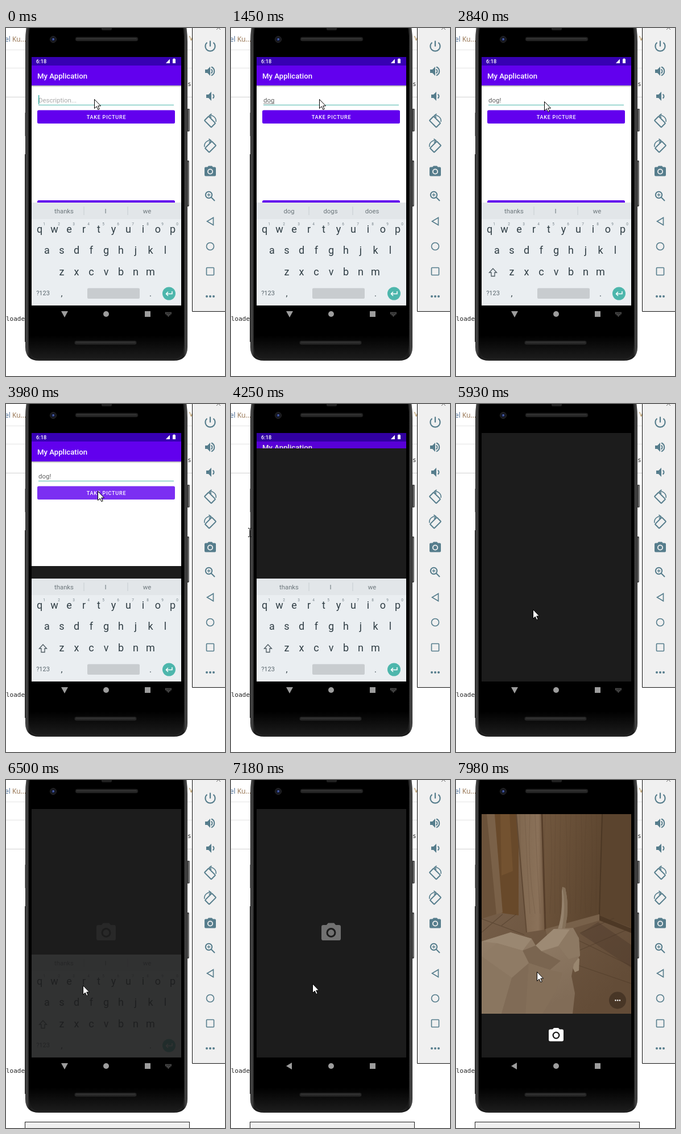
Write an HTML page that moves like this. It is 385 by 612 pixels and loops after 8 s.

```html
<!DOCTYPE html>
<html lang="en">
<head>
<meta charset="utf-8">
<title>Photo note</title>
<style>
  html, body { margin: 0; width: 100%; height: 100%; overflow: hidden; background: #fff; }
  svg { display: block; width: 385px; height: 612px; font-family: Roboto, sans-serif; }
  .mono { font: 11px 'DejaVu Sans Mono', monospace; fill: #222; }
  .mid { text-anchor: middle; }
  .key { font-size: 18px; fill: #2f3d44; }
  .digit { font-size: 6.5px; fill: #78858c; }
  .word { font-size: 11.3px; fill: #6c767b; }
  .line { fill: none; stroke: #567d8c; stroke-width: 2; }
  .solid { fill: #567d8c; }
</style>
</head>
<body>
<svg viewBox="0 0 385 612">
  <defs>
    <linearGradient id="rim">
      <stop offset="0" stop-color="#222"/><stop offset=".008" stop-color="#4a4a4a"/>
      <stop offset=".025" stop-color="#1a1a1a"/><stop offset=".975" stop-color="#1a1a1a"/>
      <stop offset=".992" stop-color="#4a4a4a"/><stop offset="1" stop-color="#222"/>
    </linearGradient>
    <linearGradient id="chin" x2="0" y2="1">
      <stop offset=".93"/><stop offset="1" stop-color="#1c1c1c"/>
    </linearGradient>
    <linearGradient id="shade" x2="0" y2="1">
      <stop stop-color="#aaa"/><stop offset="1" stop-color="#fff"/>
    </linearGradient>
    <linearGradient id="wall" y2=".4"><stop stop-color="#72583f"/><stop offset="1" stop-color="#5c452f"/></linearGradient>
    <linearGradient id="post"><stop stop-color="#7f674f"/><stop offset=".75" stop-color="#8a7159"/><stop offset="1" stop-color="#735a43"/></linearGradient>
    <linearGradient id="floor" x2=".7" y2="1"><stop stop-color="#7e6650"/><stop offset="1" stop-color="#634c37"/></linearGradient>
    <linearGradient id="fur" x2=".5" y2="1"><stop stop-color="#95816b"/><stop offset="1" stop-color="#816c57"/></linearGradient>
    <clipPath id="view"><path d="M45 60h263v351H45z"/></clipPath>
    <clipPath id="screen"><path d="M45 51h263v437H45z"/></clipPath>
    <g id="camera">
      <path fill-rule="evenodd" d="M-3-10-4.8-8H-8a2 2 0 0 0-2 2V6a2 2 0 0 0 2 2H8a2 2 0 0 0 2-2V-6a2 2 0 0 0-2-2H4.8L3-10zM0-5a5 5 0 0 1 0 10A5 5 0 0 1 0-5z"/>
      <circle r="3.2"/>
    </g>
    <g id="turn">
      <rect x="-5.2" y="-8.500" width="10.400" height="17" rx="1" transform="translate(-.5 1) rotate(-45)"/>
      <path d="M-2-10.200A10.200 10.200 0 0 1 10.200 1M2.500-13-1.500-10.200 2-6.500" stroke-width="1.600"/>
    </g>
  </defs>

  <rect width="385" height="612" fill="#fff"/>
  <path d="M0 38.500h385M0 70.500h385" stroke="#e4e4e4"/>
  <path d="M0 121.500h385" stroke="#d2d2d2"/>
  <text x="-2" y="24" font-size="12" fill="#3f648f" font-family="Open Sans, sans-serif">el <tspan fill="#8f6a45">Ku...</tspan></text>
  <text x="322" y="22" font-size="11" fill="#a98343">V</text>
  <text class="mono" x="319" y="102">s</text>
  <text class="mono" x="0" y="515">loade</text>

  <path d="M318 142h4q1 0 1 2v36q0 2-2 2h-3zM318 233h3q1 0 1 2v77q0 2-2 2h-2z" fill="#4a4a4a"/>
  <path d="M321.500 144v36M320.500 236v75" stroke="#8b8b8b"/>
  <path d="M33.500 149v41" stroke="#999"/><path d="M33.500 222v330" stroke="#333"/>
  <path d="M37-10Q34 8 34 24V561Q34 585 58 585H295Q319 585 319 561V24Q319 8 316-10z" fill="url(#rim)"/>
  <path d="M43-10 40 14V558Q41 580 61 582H292Q312 580 313 558V14L310-10z" fill="url(#chin)"/>
  <path d="M44 577Q50 583 60 583H293Q303 583 309 577" fill="none" stroke="#2c2c2c"/>
  <rect x="168" y="-4" width="18" height="8" rx="2" fill="#202020"/>
  <g fill="#272727" stroke="#111"><rect x="122" y="16" width="110" height="7" rx="3"/><rect x="120.500" y="550" width="109" height="7" rx="3"/></g>
  <path d="M124 18.500h105M123 552.500h104" stroke="#393939"/>
  <circle cx="83" cy="20" r="5.500" fill="#16171e" stroke="#292929"/>
  <circle cx="83" cy="20" r="2.300" fill="#283c83"/><circle cx="83.500" cy="19.500" r=".8" fill="#93a4dd"/>

  <g clip-path="url(#screen)">
    <rect x="45" y="51" width="263" height="437" fill="#fff"/>
    <g id="form">
      <rect x="45" y="101" width="263" height="3" fill="url(#shade)"/>
      <rect x="45" y="66" width="263" height="35" fill="#6200ee"/>
      <text x="55" y="89" font-size="13.200" font-weight="500" fill="#fff">My Application</text>
      <text id="entry" x="57" y="131" font-size="11.450"></text>
      <path id="compose" stroke="#666" stroke-width=".8"/>
      <rect id="caret" y="118" width="1.300" height="16" fill="#26a69a"/>
      <path d="M57 135.500h238" stroke="#80cbc4" stroke-width="1.300"/>
      <rect id="button" x="55" y="144.500" width="242" height="23.500" rx="2.500"/>
      <text class="mid" x="176.500" y="160" font-size="9" font-weight="500" letter-spacing=".8" fill="#fff">TAKE PICTURE</text>
      <rect x="55" y="303" width="242" height="23" rx="2.500" fill="#6200ee"/>
    </g>
    <rect x="45" y="51" width="263" height="15" fill="#3700b3"/>
    <rect id="dim" x="45" y="51" width="263" height="256"/>
    <text x="53" y="62" font-size="9.200" font-weight="500" fill="#fff">6:18</text>
    <path d="M281 62 288 54.500V62zM293 54.500h1.500V53.500h2V54.500H298V62h-5z" fill="#fff"/>
    <rect id="cover" x="45" width="263" height="437" fill="#1c1c1c"/>

    <g id="keyboard">
      <rect x="45" y="307" width="263" height="181" fill="#eaeef1"/>
      <rect x="45" y="307" width="263" height="29" fill="#e2e6e9"/>
      <path d="M137 314v15M214 314v15" stroke="#c6ccd0"/>
      <g id="keys"></g>
      <path id="shift" d="M65 423 58.500 430H62v6.500h6V430h3.500z" fill="none" stroke="#4c5960" stroke-width="1.300"/>
      <text class="mid" x="65" y="470" font-size="11" fill="#59666d">?123</text>
      <text class="key mid" x="98" y="472" style="font-size:15px">,</text>
      <text class="key mid" x="254" y="472" style="font-size:15px">.</text>
      <rect id="space" x="143" y="457.500" width="92" height="18.500" rx="2" fill="#c8cccf"/>
      <circle cx="286.500" cy="467" r="11.500" fill="#4db6ac"/>
      <path d="M292 463v4.500H281.500m3.500-3.500-3.500 3.500 3.500 3.500" fill="none" stroke="#fff" stroke-width="1.500"/>
    </g>

    <g id="photo">
      <path d="M45 51h263v360H45z" fill="#000"/>
      <g clip-path="url(#view)">
        <path d="M45 60h263v351H45z" fill="url(#floor)"/>
        <path d="M66 60h44v178l-30-4z" fill="#68492a"/>
        <path d="M78 60h16l6 100-20 8z" fill="#735230"/>
        <path d="M45 60h23l14 173-37 11z" fill="#7a6148"/>
        <path d="M45 60h9l17 176-26 8z" fill="#6b523a"/>
        <path d="M150 60h107l-5 178-97 28z" fill="url(#wall)"/>
        <path d="M257 60h51v200l-56-22z" fill="#5b442e"/>
        <path d="M257 60 252 238" stroke="#4b3724" stroke-width="2"/>
        <path d="M106 60h45l6 203-33 5z" fill="url(#post)"/>
        <path d="M106 60 124 268" stroke="#614a35" stroke-width="2"/>
        <path d="M151 60 157 263" stroke="#573f2b" stroke-width="3"/>
        <path d="M157 262 252 236v11l-92 27z" fill="#78614a"/>
        <path d="M252 238 308 261v8l-56-22z" fill="#4d3825"/>
        <g id="grain" fill="none" stroke="#4e3828" opacity=".2"></g>
        <path d="M45 244 120 272M45 268 82 236M80 256l26-20M215 282l93 45M212 325l96 33M218 269l60-26M216 300l92-40" stroke="#4c3826" stroke-width="1.300" opacity=".5"/>
        <path d="M218 270 250 250 308 290V330z" fill="#49352a" opacity=".4"/>
        <path d="M178 265Q188 238 186 196L187 188 192 190Q201 230 190 266z" fill="#95826c"/>
        <path d="M187 188 192 190Q201 230 190 266L186 263Q194 225 187 188z" fill="#847059"/>
        <path d="M205 300 217 315 216 335 209 338 203 326z" fill="#99866f"/>
        <path d="M45 284 96 268 133 279 140 291 172 262 206 260 216 278 218 309 207 324 203 345 209 375 205 411H45z" fill="url(#fur)"/>
        <path d="M45 284 96 268 133 279 117 300 72 287z" fill="#9a8771"/>
        <path d="M140 291 172 262 200 263 180 292 150 301z" fill="#9d8a74"/>
        <path d="M180 292 200 263 216 278 218 309 198 315z" fill="#8d7963"/>
        <path d="M117 300 140 291 150 301 184 318 165 334 128 322z" fill="#7a6550"/>
        <path d="M128 322 165 334 187 339 176 371 152 411H122z" fill="#846f59"/>
        <path d="M45 310 72 287 117 300 128 322 98 348z" fill="#8f7b65"/>
        <path d="M45 310 98 348 80 411H45z" fill="#8a7660"/>
        <path d="M98 348 128 322 122 411H80z" fill="#806b56"/>
      </g>
      <circle cx="284" cy="387.500" r="15" fill="#3f2f22" opacity=".75"/>
      <path d="M280.500 387.500h0m3.700 0h0m3.700 0h0" stroke="#fff" stroke-width="2.600" stroke-linecap="round"/>
    </g>
    <use id="shutter" href="#camera"/>
  </g>

  <g fill="#9d9d9d">
    <path id="back"/>
    <circle cx="176" cy="503" r="5"/><path d="M244 498h10v10h-10z"/>
  </g>
  <g id="imeIcon" stroke="#777" fill="none"><path d="M280 500.500h11M280 502.500h11" stroke-width="1.500" stroke-dasharray="1.500 .8"/><path d="M282 504.500h7"/><path d="M284 506.500h3"/></g>
  <rect id="panel" x="33.500" y="601.500" width="289" height="30" fill="#f0f0f0" stroke="#222"/>

  <path d="M327.500-2V498.500H390V-2z" fill="#f0f0f0" stroke="#111"/>
  <path d="M370-4l7 7m0-7-7 7" stroke="#666"/>
  <g class="line">
    <path d="M359 22.500v10M353.500 25.500a8.600 8.600 0 1 0 11 0" stroke-width="2.200"/>
    <path d="M360.500 72.500a4 4 0 0 1 0 7M361 68.500a8 8 0 0 1 0 15"/>
    <path d="M363.500 116.500a4 4 0 0 1 0 7"/>
    <use href="#turn" x="359" y="164"/>
    <use href="#turn" transform="translate(359 208) scale(-1 1)"/>
    <circle cx="356.500" cy="293.500" r="5.700"/>
    <path d="M360.500 297.500 367 304"/><path d="M353.500 293.500h6m-3-3v6" stroke-width="1.300"/>
    <path d="M364.500 333.500v13L353.500 340z" stroke-width="1.600"/>
    <circle cx="359" cy="384" r="6.500" stroke-width="1.600"/>
    <rect x="352.500" y="421.500" width="13" height="13" rx="1" stroke-width="1.600"/>
  </g>
  <g class="solid">
    <path d="M350 73h4l5-5v16l-5-5h-4zM352 117h4l5-5v16l-5-5h-4z"/>
    <use href="#camera" transform="translate(359 252.500)"/>
    <circle cx="353" cy="472" r="2"/><circle cx="359" cy="472" r="2"/><circle cx="365" cy="472" r="2"/>
  </g>

  <path id="arrow" d="M.5.5V16.500L4.200 13 6.800 18.500 9.200 17.500 6.700 12H11.500z" fill="#fff" stroke="#000"/>
  <path id="beam" d="M-3 .5H-1L0 1.500 1 .5H3M0 1.500v13M-3 15.500H-1L0 14.500 1 15.500H3" fill="none" stroke="#000"/>
</svg>
<script>
const el = id => document.getElementById(id);
const set = (id, attrs) => Object.entries(attrs).forEach(([k, v]) => el(id).setAttribute(k, v));
const show = (id, on) => { el(id).style.display = on ? '' : 'none'; };
const LOOP = 8000, OFFSCREEN = 500;

function label(text, x, y, cls) {
  const node = document.createElementNS('http://www.w3.org/2000/svg', 'text');
  node.textContent = text;
  node.setAttribute('x', x);
  node.setAttribute('y', y);
  node.setAttribute('class', cls + ' mid');
  el('keys').append(node);
  return node;
}

[['qwertyuiop', 59, 360], ['asdfghjkl', 72, 397], ['zxcvbnm', 98, 435]].forEach(([row, x, y], r) =>
  [...row].forEach((letter, i) => {
    label(letter, x + i * 26, y, 'key');
    if (r === 0) label((i + 1) % 10, x + 8 + i * 26, 347, 'digit');
  }));
const wordNodes = [102, 175, 248].map(x => label('', x, 326, 'word'));

// Faint wood grain on the walls
for (let i = 0; i < 16; i++) {
  const x = 112 + i * 9, sway = Math.sin(i * 2.3) * 5;
  el('grain').insertAdjacentHTML('beforeend', `<path d="M${x} 60q${sway} 90 ${i < 5 ? 9 : -1} 175"/>`);
}

const common = ['thanks', 'I', 'we'];
const steps = [
  [0, { text: '', caret: 57, words: common, shift: false, arrow: [155, 125], beam: null, press: false,
        cover: OFFSCREEN, lift: 0, dim: 0, keys: 1, icon: 0, iconAt: [176, 268.5, 1.7], photo: 0,
        panel: false, left: false }],
  [530, { text: 'd', caret: 63, words: ['do', 'd', 'did'] }],
  [680, { text: 'do', caret: 69.5, words: ['so', 'do', "don't"] }],
  [950, { text: 'dog', caret: 76.3, words: ['dog', 'dogs', 'does'] }],
  [1450, { caret: 0 }],
  [1850, { caret: 76.3 }],
  [2290, { text: 'dog!', caret: 79.3, words: common, shift: true }],
  [2840, { caret: 0, arrow: [155, 129] }],
  [3000, { arrow: [158, 144] }],
  [3150, { arrow: [159, 151] }],
  [3300, { caret: 79.3, arrow: [161, 153] }],
  [3840, { caret: 0, press: true }],
  [3980, { cover: 285 }],
  [4110, { cover: 200, lift: -1, arrow: [110, 190] }],
  [4250, { cover: 78, lift: -8, arrow: null, beam: [33, 218], dim: 0.1 }],
  [4370, { beam: [28, 218], cover: 56 }],
  [4490, { cover: 51 }],
  [4650, { beam: null, keys: 0 }],
  [5190, { beam: [19, 386] }],
  [5320, { beam: null, arrow: [40, 395] }],
  [5470, { arrow: [45, 395] }],
  [5780, { arrow: [117, 366] }],
  [5930, { arrow: [135, 361] }],
  [6500, { keys: 0.1, icon: 0.05, panel: true }],
  [6640, { keys: 0, icon: 0.38, left: true }],
  [7180, { arrow: [143, 358] }],
  [7320, { photo: 0.5, icon: 1, iconAt: [176, 449, 1.3], arrow: [170, 380] }],
  [7450, { photo: 1, arrow: [201, 401] }],
  [7860, { arrow: [170, 366] }],
  [7980, { arrow: [142, 337] }],
];

function place(id, pos) {
  show(id, pos);
  if (pos) set(id, { transform: `translate(${pos})` });
}

function render(t) {
  const s = Object.assign({}, ...steps.filter(([at]) => at <= t).map(([, change]) => change));
  el('entry').textContent = s.text || 'Description...';
  set('entry', { fill: s.text ? '#606060' : '#a9a9a9' });
  const composing = s.text && !s.text.endsWith('!');
  set('compose', { d: composing ? `M57 133h${s.text.length * 6.5}` : '' });
  show('caret', s.caret);
  set('caret', { x: s.caret });
  wordNodes.forEach((node, i) => { node.textContent = s.words[i]; });
  show('shift', s.shift);
  set('button', { fill: s.press ? '#7b2ff2' : '#6200ee' });
  place('form', [0, s.lift]);
  set('cover', { y: s.cover });
  set('dim', { opacity: s.dim });
  set('keyboard', { opacity: s.keys });
  show('space', s.keys === 1);
  set('photo', { opacity: s.photo });
  const [x, y, scale] = s.iconAt;
  set('shutter', { transform: `translate(${x} ${y}) scale(${scale})`, opacity: s.icon, fill: '#fff' });
  set('back', { d: s.left ? 'M97 503l10-6v12z' : 'M97 498h12l-6 11z' });
  show('imeIcon', !s.left);
  show('panel', s.panel);
  place('arrow', s.arrow);
  place('beam', s.beam);
}

const start = performance.now();
function tick() {
  render((performance.now() - start) % LOOP);
  requestAnimationFrame(tick);
}
tick();
</script>
</body>
</html>
```
